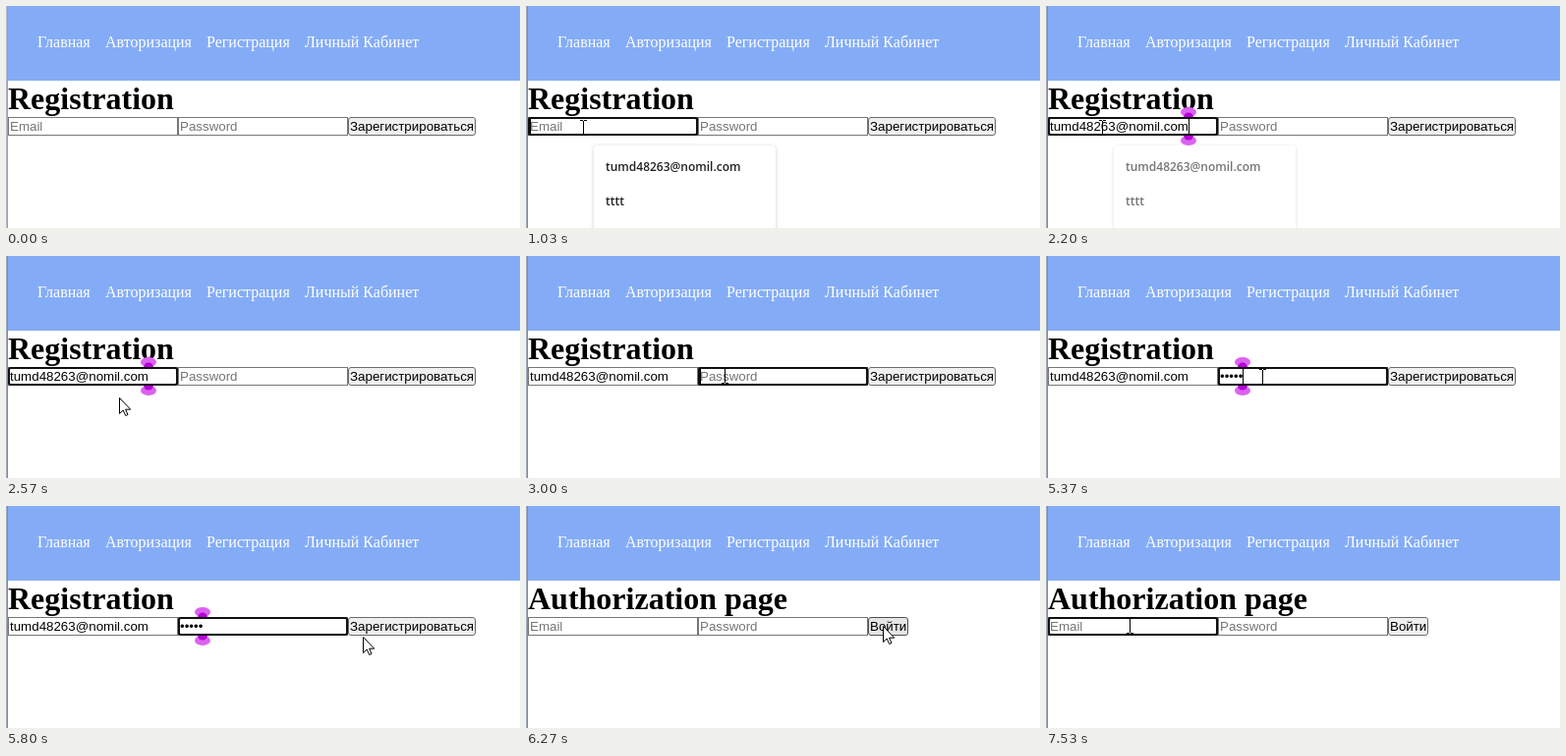
These frames come from a looping animation (523x226 px, 8 s). An HTML page:

```html
<!DOCTYPE html>
<html lang="ru">
<head>
<meta charset="utf-8">
<title>Registration form</title>
<style>
  html, body { margin: 0; width: 523px; height: 226px; overflow: hidden; background: #fff; }
  #stage { position: relative; width: 523px; height: 226px; overflow: hidden; background: #fff; }
  #stage * { position: absolute; box-sizing: border-box; white-space: pre; }
  nav { left: 2px; top: 0; width: 521px; height: 76px; background: #84acf6; }
  nav span { top: 28px; font: 16px/18px "Liberation Serif", "Times New Roman", serif; color: #fff; }
  h1 { left: 2px; top: 76px; margin: 0; font: bold 32px/37px "Liberation Serif", "Times New Roman", serif; color: #000; }
  .field, .button { top: 113px; height: 19px; font: 13.333px/15px "Liberation Sans", Arial, sans-serif; border: 1px solid #767676; }
  .field { width: 173px; background: #fff; }
  .field span { left: 1px; top: 1px; }
  .field.hover { border-color: #4f4f4f; }
  .field::after { content: ""; position: absolute; inset: -1px; border: 2px solid #101010; border-radius: 3px; display: none; }
  .field.focus::after { display: block; }
  .button { left: 348px; padding: 1px; border-color: #6b6b6b; border-radius: 3px; background: #efefef; color: #000; }
  .button.hover { background: #e5e5e5; border-color: #4f4f4f; }
  .button.active { background: #f5f5f5; border-color: #8d8d8d; }
  #edge { left: 0; top: 0; width: 2px; height: 226px; }
  #list { left: 69px; top: 142px; width: 185px; height: 110px; background: #fff; border-radius: 4px; box-shadow: 0 1px 4px rgba(0,0,0,.2); }
  #list span { left: 12px; font: 600 12px/18px "Open Sans", "Noto Sans", sans-serif; color: #202124; }
  #caret { top: 115px; width: 1px; height: 15px; background: #000; }
  svg { left: 0; top: 0; overflow: visible; }
</style>
</head>
<body>
<div id="stage">
  <nav>
    <span style="left:30px">Главная</span>
    <span style="left:99px">Авторизация</span>
    <span style="left:202px">Регистрация</span>
    <span style="left:302px">Личный Кабинет</span>
  </nav>
  <div id="edge"></div>
  <h1 id="title"></h1>
  <div class="field" id="email" style="left:2px"><span></span></div>
  <div class="field" id="pass" style="left:175px"><span></span></div>
  <div class="button" id="button"></div>
  <div id="list">
    <span style="top:13px">tumd48263@nomil.com</span>
    <span style="top:48px">tttt</span>
  </div>
  <div id="caret"></div>
  <svg width="523" height="226">
    <g id="marker">
      <g fill="#dc62f0"><ellipse cy="108" rx="8" ry="5"/><ellipse cy="137" rx="8" ry="5"/></g>
      <g fill="#b400d8"><path d="M-5 113Q-4 108.5 0 108.5T5 113Z"/><path d="M-5 132Q-4 136.5 0 136.5T5 132Z"/></g>
    </g>
    <path id="arrow" d="M.5.5V16.5L4.2 13L6.7 18.5L9 17.5L6.6 12.2H11.7Z" fill="#fff" stroke="#000"/>
    <path id="beam" d="M-3 -7.5H0M1 -7.5H4M.5 -7V7M-3 7.5H0M1 7.5H4" fill="none" stroke="#000"/>
  </svg>
</div>
<script>
const LOOP = 8000, TICK = 100 / 3, BLINK = 515;
const MAIL = "tumd48263@nomil.com";
const $ = id => document.getElementById(id);

// Pointer path: time, x, y, and 1 where it slows on arrival
const path = [
  [0, 80, 240], [300, 80, 240], [330, 79, 221], [530, 59, 135, 1], [670, 59, 135], [730, 58, 124],
  [1790, 58, 124], [1800, 57, 124], [2440, 57, 124], [2600, 130, 149], [2780, 352, 126],
  [2960, 202, 122, 1], [5340, 202, 122], [5800, 363, 133, 1], [5930, 372, 131], [6100, 363, 122, 1],
  [6340, 363, 122], [6580, 205, 144], [6830, 85, 122, 1], [LOOP, 85, 122]
];

// Focus: time, field id, caret x
const carets = [
  [0, "", 0], [985, "email", 4], [2030, "email", 145], [2985, "pass", 177],
  [3830, "pass", 182], [4130, "pass", 186], [4430, "pass", 191], [4730, "pass", 196], [5030, "pass", 200],
  [6130, "", 0], [7000, "email", 4]
];

// Marker: time, centre x (0 hides it)
const markers = [
  [0, 0], [2030, 145], [2985, 0], [3830, 182], [4130, 186], [4470, 191], [4770, 196], [5070, 200], [6130, 0]
];

const latest = (rows, t) => rows.filter(r => r[0] <= t).pop();
const clamp = v => Math.min(1, Math.max(0, v));
const show = (el, on) => el.style.display = on ? "" : "none";
const place = (el, x, y) => el.setAttribute("transform", `translate(${x} ${y})`);

function pointer(time) {
  const t = Math.floor((time + 1) / TICK) * TICK;
  const i = Math.max(1, path.findIndex(k => k[0] > t));
  const a = path[i - 1], b = path[i];
  let p = clamp((t - a[0]) / (b[0] - a[0]));
  if (b[3]) p = 1 - (1 - p) ** 2;
  return [1, 2].map(n => Math.round(a[n] + (b[n] - a[n]) * p));
}

function setField(el, value, hint, hover, focus) {
  const text = el.firstElementChild;
  text.textContent = value || hint;
  text.style.color = value ? "#000" : "#757575";
  el.classList.toggle("hover", hover);
  el.classList.toggle("focus", focus);
}

function draw(t) {
  const login = t >= 6270;
  const [x, y] = pointer(t);
  const inRow = y >= 113 && y < 132;
  const [since, focus, caretX] = latest(carets, t);
  const dots = login ? 0 : carets.filter(c => c[1] === "pass" && c[2] > 177 && c[0] <= t).length;

  $("title").textContent = login ? "Authorization page" : "Registration";
  setField($("email"), t >= 2030 && !login ? MAIL : "", "Email", inRow && x < 175, focus === "email");
  setField($("pass"), "•".repeat(dots), "Password", inRow && x >= 175 && x < 348, focus === "pass");

  const button = $("button"), width = login ? 41 : 130;
  button.textContent = login ? "Войти" : "Зарегистрироваться";
  button.style.width = width + "px";
  button.classList.toggle("hover", inRow && x >= 348 && x < 348 + width);
  button.classList.toggle("active", t >= 6130 && !login);

  $("edge").style.background = t < 985
    ? "linear-gradient(90deg, #b3bac8 50%, #8ba3c9 50%)"
    : "linear-gradient(90deg, #a3acbb 50%, #6f8db8 50%)";

  const fadeIn = clamp((t - 940) / 90), fadeOut = 1 - clamp((t - 2030) / 300) ** 1.7;
  $("list").style.opacity = fadeIn * fadeOut;

  show($("caret"), focus && Math.floor((t - since) / BLINK) % 2 === 0);
  $("caret").style.left = caretX + "px";

  const markerX = latest(markers, t)[1];
  show($("marker"), markerX);
  place($("marker"), markerX, 0);

  const typing = inRow && x < 348;
  show($("beam"), typing);
  show($("arrow"), !typing);
  place($(typing ? "beam" : "arrow"), x, y);
}

const start = performance.now();
function frame() {
  draw((performance.now() - start) % LOOP);
  requestAnimationFrame(frame);
}
draw(0);
requestAnimationFrame(frame);
</script>
</body>
</html>
```
